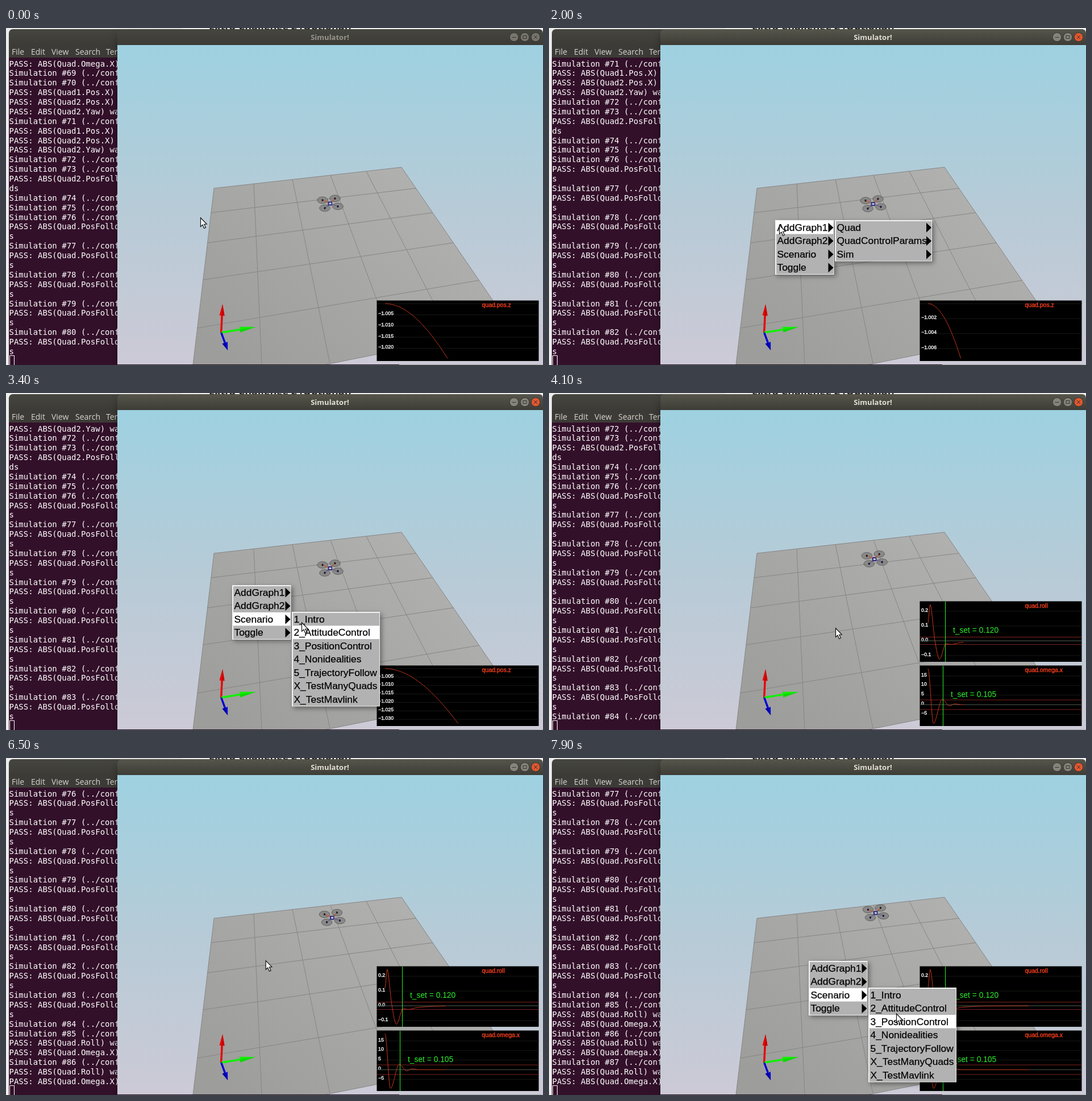
An HTML page with a canvas that plays this animation: 945x593 px, repeating every 8 s.

```html
<!DOCTYPE html>
<html lang="en">
<head>
<meta charset="utf-8">
<title>Simulator</title>
<style>
html, body { margin: 0; height: 100%; overflow: hidden; background: #eee; }
canvas { display: block; }
</style>
</head>
<body>
<canvas id="stage" width="945" height="593"></canvas>
<script>
const ctx = document.getElementById('stage').getContext('2d');
const LOOP = 8000, STEP = 100, SWITCH = 3842;
const HELD = [600, 1400, 3700];            // moments at which the picture stands still
const SANS = '"Liberation Sans", sans-serif', UI = '"Open Sans", sans-serif';

// ---------- drawing helpers ----------
function rect(x, y, w, h, fill) { ctx.fillStyle = fill; ctx.fillRect(x, y, w, h); }

function text(str, x, y, font, fill, align = 'left', weight = 0) {
  ctx.font = font; ctx.fillStyle = ctx.strokeStyle = fill; ctx.textAlign = align;
  ctx.fillText(str, x, y);
  if (weight) { ctx.lineWidth = weight; ctx.strokeText(str, x, y); }
}

function trace(points) {
  ctx.beginPath();
  points.forEach(([x, y]) => ctx.lineTo(x, y));
}

function line(points, stroke, width = 1) {
  trace(points);
  ctx.strokeStyle = stroke; ctx.lineWidth = width; ctx.stroke();
}

function shape(points, fill) { trace(points); ctx.closePath(); ctx.fillStyle = fill; ctx.fill(); }

function disc(x, y, rx, ry, fill) {
  ctx.beginPath(); ctx.ellipse(x, y, rx, ry, 0, 0, 7);
  ctx.fillStyle = fill; ctx.fill();
}

function shadowed(blur, alpha, paint) {
  ctx.save();
  ctx.shadowColor = `rgba(0,0,0,${alpha})`; ctx.shadowBlur = blur;
  ctx.shadowOffsetX = ctx.shadowOffsetY = 3;
  paint();
  ctx.restore();
}

function vertical(y0, y1, ...colors) {
  const g = ctx.createLinearGradient(0, y0, 0, y1);
  colors.forEach((c, i) => g.addColorStop(i / (colors.length - 1), c));
  return g;
}

function titleBar(x, w, active) {
  ctx.beginPath(); ctx.roundRect(x, 2, w, 28, [7, 7, 0, 0]);
  ctx.fillStyle = active ? vertical(2, 30, '#57564c', '#3d3c36') : vertical(2, 30, '#464640', '#3c3b36');
  ctx.fill();
}

// ---------- terminal ----------
const sim = n => `Simulation #${n} (../config/`;
const pass = name => `PASS: ABS(${name}) was less`;
const follow = n => [sim(n), pass('Quad.PosFollowErr'), 's'];
const attitude = n => [sim(n), pass('Quad.Roll'), pass('Quad.Omega.X')];
const pair = n => [sim(n), pass('Quad1.Pos.X'), pass('Quad2.Pos.X'), pass('Quad2.Yaw')];
const history = [
  pass('Quad.Omega.X'), sim(69), ...pair(70), ...pair(71), sim(72),
  sim(73), pass('Quad2.PosFollowErr'), 'ds', sim(74), sim(75),
  ...[76, 77, 78, 79, 80].flatMap(follow)
];
const prints = [
  [655, follow(81)], [1763, follow(82)], [2871, follow(83)], [SWITCH, [sim(84)]],
  [SWITCH + 1110, attitude(85)], [SWITCH + 2220, attitude(86)], [SWITCH + 3330, attitude(87)]
];

function drawTerminal(t) {
  rect(5, 30, 687, 563, '#3c3b37');
  titleBar(5, 687, false);
  ['File', 'Edit', 'View', 'Search', 'Terminal'].forEach((label, i) =>
    text(label, [10, 44, 80, 122, 176][i], 47, `14px ${UI}`, '#d8d5cc'));
  rect(5, 52, 687, 541, '#33102a');
  const log = [...history, ...prints.filter(([at]) => t >= at).flatMap(p => p[1])];
  log.slice(-31).forEach((row, i) =>
    text(row, 5.5, 67.5 + 16.88 * i, '14px "DejaVu Sans Mono", monospace', '#fff'));
  ctx.strokeStyle = '#fff'; ctx.lineWidth = 1;
  ctx.strokeRect(6.5, 576.5, 8, 17);
}

// ---------- simulator window ----------
function drawWindow(active) {
  shadowed(16, .5, () => rect(196, 10, 749, 582, '#3c3b36'));
  titleBar(196, 749, active);
  text('Simulator!', 570, 20.5, `bold 13px ${UI}`, active ? '#e4e0d6' : '#98958b', 'center');
  [894, 913, 932].forEach((x, i) => {
    disc(x, 16, 8, 8, '#33322d');
    disc(x, 16, 7.3, 7.3, active ? (i === 2 ? '#e2572f' : '#85837a') : '#77756c');
    const ink = '#35342f';
    if (i === 0) line([[x - 3.5, 16.5], [x + 3.5, 16.5]], ink);
    if (i === 1) { ctx.strokeStyle = ink; ctx.strokeRect(x - 3, 13.5, 6, 5); }
    if (i === 2) {
      line([[x - 3, 13], [x + 3, 19]], ink);
      line([[x + 3, 13], [x - 3, 19]], ink);
    }
  });
  rect(196, 30, 749, 562, vertical(30, 592, '#9ed1e1', '#b6cbd7', '#cccad6'));
}

function drawGround() {
  const left = y => 366 - 0.119 * (y - 282), right = y => 696 + 0.686 * (y - 245);
  const fill = ctx.createLinearGradient(690, 245, 400, 593);
  fill.addColorStop(0, '#b0b0af'); fill.addColorStop(1, '#9d9d9b');
  const ink = '#868685';
  // Rows run from the left edge to the right edge; the first and last bound the floor.
  const rows = [[282, 245], [325, 282], [378, 325], [443, 378], [528, 444], [640, 527]]
    .map(([a, b]) => [[left(a), a], [right(b), b]]);
  const [farLeft, farRight] = rows[0], [nearLeft, nearRight] = rows[5];
  ctx.save();
  ctx.beginPath(); ctx.rect(196, 30, 749, 562); ctx.clip();
  const outline = [farLeft, farRight, nearRight, nearLeft];
  shape(outline, fill);
  line([nearLeft, farLeft], ink);
  line([farRight, nearRight], ink);
  rows.forEach(row => line(row, ink));
  trace(outline); ctx.clip();
  [[436, 274, 450], [504, 266, 570.5], [571, 259, 695], [634, 252, 809]].forEach(([x, y, end]) =>
    line([[x, y], [end, 593]], ink));
  ctx.restore();
}

function arrow(dx, dy, headLength, halfWidth, color, dark) {
  const x = 378.7, y = 536, len = Math.hypot(dx, dy), ux = dx / len, uy = dy / len;
  const bx = x + dx - ux * headLength, by = y + dy - uy * headLength;
  line([[x, y], [bx, by]], color, 3.4);
  const side = s => [bx - uy * halfWidth * s, by + ux * halfWidth * s];
  shape([side(-1), [x + dx, y + dy], side(1)], color);
  shape([[bx, by], [x + dx, y + dy], side(1)], dark);
}

function drawAxes() {
  arrow(2.3, -50, 20, 4.5, '#e60000', '#c80000');
  arrow(60.5, -10, 28, 5, '#10f000', '#0cd800');
  arrow(11.5, 31, 14, 5, '#0000d0', '#0000a8');
}

function drawDrone(x, y) {
  const rotors = [[-13.5, -6], [8.5, -9], [-9.5, 8], [13.5, 5]];
  rotors.forEach(([dx, dy]) => {
    disc(x + dx, y + dy, 9.3, 5.8, 'rgba(122,122,122,.7)');
    ctx.strokeStyle = '#606060'; ctx.lineWidth = 1; ctx.stroke();
  });
  rotors.forEach(([dx, dy], i) => {
    line([[x, y], [x + dx, y + dy]], i < 2 ? '#c4552f' : '#6a5a86', 1.3);
    disc(x + dx, y + dy, 1.6, 2, i < 2 ? '#2a1c1c' : '#1c1836');
  });
  rect(x - 4, y - 3.5, 7.5, 7, '#2c2c78');
  rect(x - 2, y - 1.5, 4, 3, '#c8c8e8');
}

// ---------- graphs ----------
// Cubic curve through a few points, flat at every turning point.
function curve(points) {
  const slope = i => {
    const [p, q, r] = [points[i - 1], points[i], points[i + 1]];
    if (!p || !r || (q[1] - p[1]) * (r[1] - q[1]) <= 0) return 0;
    return (r[1] - p[1]) / (r[0] - p[0]);
  };
  return u => {
    let i = 0;
    while (i < points.length - 2 && u > points[i + 1][0]) i++;
    const [x0, y0] = points[i], [x1, y1] = points[i + 1];
    const h = x1 - x0, s = Math.min(1, (u - x0) / h), r = 1 - s;
    return y0 * (1 + 2 * s) * r * r + y1 * s * s * (3 - 2 * s)
      + h * s * r * (slope(i) * r - slope(i + 1) * s);
  };
}

const climb = u => u * u * (2.4 - 0.0034 * u) * 1e-6;
const altitude = { name: 'quad.pos.z', top: 480, value: u => -1 - climb(u) };
const roll = {
  name: 'quad.roll', top: 367, band: 0.025,
  value: curve([[0, .12], [3.5, .247], [12, .004], [20, -.125], [30, -.0255], [33, -.021],
    [41, -.0245], [58, -.011], [105, -.002], [290, 0]])
};
const omega = {
  name: 'quad.omega.x', top: 480, band: 2.5,
  value: curve([[0, 18.8], [9.5, -9.8], [25, 2.8], [38, -.6], [47, .5], [60, 0], [290, 0]])
};

function tickStep(range) {
  for (let e = -7; ; e++)
    for (const m of [1, 2, 5])
      if (range / (m * 10 ** e) <= 7) return [m * 10 ** e, Math.max(0, -e)];
}

function drawGraph({ name, top, band, value }, u) {
  const samples = [];
  for (let s = 0; s < u; s += 1.25) samples.push([s, value(s)]);
  samples.push([u, value(u)]);
  const values = samples.map(p => p[1]);
  const max = Math.max(...values), min = Math.min(...values), range = Math.max(max - min, 1e-6);
  const yOf = v => top + 5 + 96.5 * (max - v) / range;
  const level = (v, color) => {
    const y = yOf(v);
    if (y > top && y < top + 106) line([[653, y], [937.5, y]], color);
  };

  rect(652.5, top - .5, 285, 106.5, '#000');
  const [step, digits] = tickStep(range);
  for (let i = Math.ceil(min / step); i * step <= max + step * .01; i++) {
    level(i * step, '#161a16');
    const y = yOf(i * step);
    if (y > top + 12) text((i * step).toFixed(digits).replace('-', '−'), 655, y + .7, `8.8px ${SANS}`, '#f2f2f2', 'left', .4);
  }
  if (band) {
    level(0, '#4c564c');
    level(band, '#7c2420');
    level(-band, '#7c2420');
  }
  line(samples.map(([s, v]) => [667 + s, yOf(v)]), '#c8361a');
  text(name, 837.5, top + 11, `10.5px ${SANS}`, '#f03c1c', 'left', .4);

  if (band) {
    const outside = samples.filter(p => Math.abs(p[1]) > band).pop();
    const settled = outside ? outside[0] : 0;
    const color = u - settled > 25 ? '#2cf02c' : '#3a7a34';
    const x = Math.round(667 + settled) + .5;
    line([[x, top], [x, top + 106]], color);
    text(`t_set = ${(settled / 250).toFixed(3)}`, x + 13.5, top + 54.5, `13.8px ${SANS}`, color);
  }
}

// ---------- menus ----------
const MAIN = ['AddGraph1', 'AddGraph2', 'Scenario', 'Toggle'];
const GRAPH = ['Quad', 'QuadControlParams', 'Sim'];
const SCENARIOS = ['1_Intro', '2_AttitudeControl', '3_PositionControl', '4_Nonidealities',
  '5_TrajectoryFollow', 'X_TestManyQuads', 'X_TestMavlink'];
const ROW = 23.5;
// time, selected row, selected row of the submenu
const firstMenu = { x: 398, y: 338, from: 1600, to: 3800, picks: [[1700, 0, -1], [2500, 1, -1], [2800, 2, -1], [3300, 2, 0], [3400, 2, 1]] };
const secondMenu = { x: 457, y: 357, from: 6600, to: LOOP, picks: [[6700, 0, -1], [6900, 1, -1], [7100, 2, -1], [7500, 2, 0], [7700, 2, 1], [7900, 2, 2]] };

function drawList(items, x, y, width, picked, arrows) {
  const height = items.length * ROW + 2;
  shadowed(8, .4, () => rect(x, y, width, height, '#f2f2f2'));
  rect(x + 2, y + 2, width - 3, height - 3, '#b2b2b2');
  items.forEach((item, i) => {
    const top = y + 1 + ROW * i, mid = top + 11.75;
    if (i === picked) rect(x + 1, top, width - 2, ROW, '#fff');
    text(item, x + 3.5, mid + 6, `17.4px ${SANS}`, '#000', 'left', .25);
    if (arrows) shape([[x + width - 10, mid - 8], [x + width - 1, mid + .5], [x + width - 10, mid + 9]], '#000');
  });
}

function drawMenu({ x, y, from, to, picks }, t) {
  if (t < from || t >= to) return;
  const [, row, subRow] = picks.filter(p => t >= p[0]).pop() || [0, -1, -1];
  drawList(MAIN, x, y, 103.5, row, true);
  if (row < 0) return;
  const graph = row < 2, top = y + row * ROW;
  drawList(graph ? GRAPH : SCENARIOS, x + 105, top, graph ? 171 : 155, subRow, graph);
}

// ---------- pointer ----------
const PATH = [
  [0, 342, 334], [300, 350, 334], [1000, 378, 329], [1500, 398, 338], [1700, 399, 340], [2000, 405, 347],
  [2400, 412, 358], [2800, 440, 390], [3200, 491, 399], [3400, 520, 404], [3600, 508, 412],
  [3800, 504, 414], [5300, 504, 414], [6300, 456, 356], [6600, 457, 357], [6900, 466, 376],
  [7300, 503, 414], [7900, 611, 450]
];

function drawPointer(t) {
  let i = 0;
  while (i < PATH.length - 2 && t > PATH[i + 1][0]) i++;
  const [t0, x0, y0] = PATH[i], [t1, x1, y1] = PATH[i + 1];
  const s = Math.min(1, (t - t0) / (t1 - t0));
  ctx.save();
  ctx.translate(x0 + (x1 - x0) * s, y0 + (y1 - y0) * s);
  const outline = [[.5, 0], [.5, 15.5], [4, 12.3], [6.7, 18.5], [9.4, 17.3], [6.7, 11.3], [11.2, 11]];
  shape(outline, '#fff');
  trace(outline); ctx.closePath();
  ctx.strokeStyle = '#111'; ctx.lineWidth = 1.2; ctx.stroke();
  ctx.restore();
}

// ---------- frame ----------
function draw(t) {
  rect(0, 0, 945, 593, '#ececec');
  rect(310, 0, 635, 3, '#fafafa');
  text('Extra Challenge 2 (Optional)', 357, 3, `bold 18px ${UI}`, '#222');
  drawTerminal(t);
  drawWindow(t >= 1500);
  drawGround();
  drawAxes();

  const second = t >= SWITCH;
  const age = second ? (t - SWITCH) % 1110 : (t + 453) % 1108;
  const u = age * 0.243;
  if (second) {
    const k = age / 175, rise = 1 - (1 + k) * Math.exp(-k);
    drawDrone(570.8 + 4.5 * rise, 310 - 40.5 * rise);
    drawGraph(roll, u);
    drawGraph(omega, u);
  } else {
    drawDrone(570.5, 310 - 45 * climb(u));
    drawGraph(altitude, u);
  }
  drawMenu(firstMenu, t);
  drawMenu(secondMenu, t);
  drawPointer(t);
}

const start = performance.now();
function tick() {
  const t = Math.floor((performance.now() - start) % LOOP / STEP) * STEP;
  draw(HELD.includes(t) ? t - STEP : t);
  requestAnimationFrame(tick);
}
tick();
</script>
</body>
</html>
```
